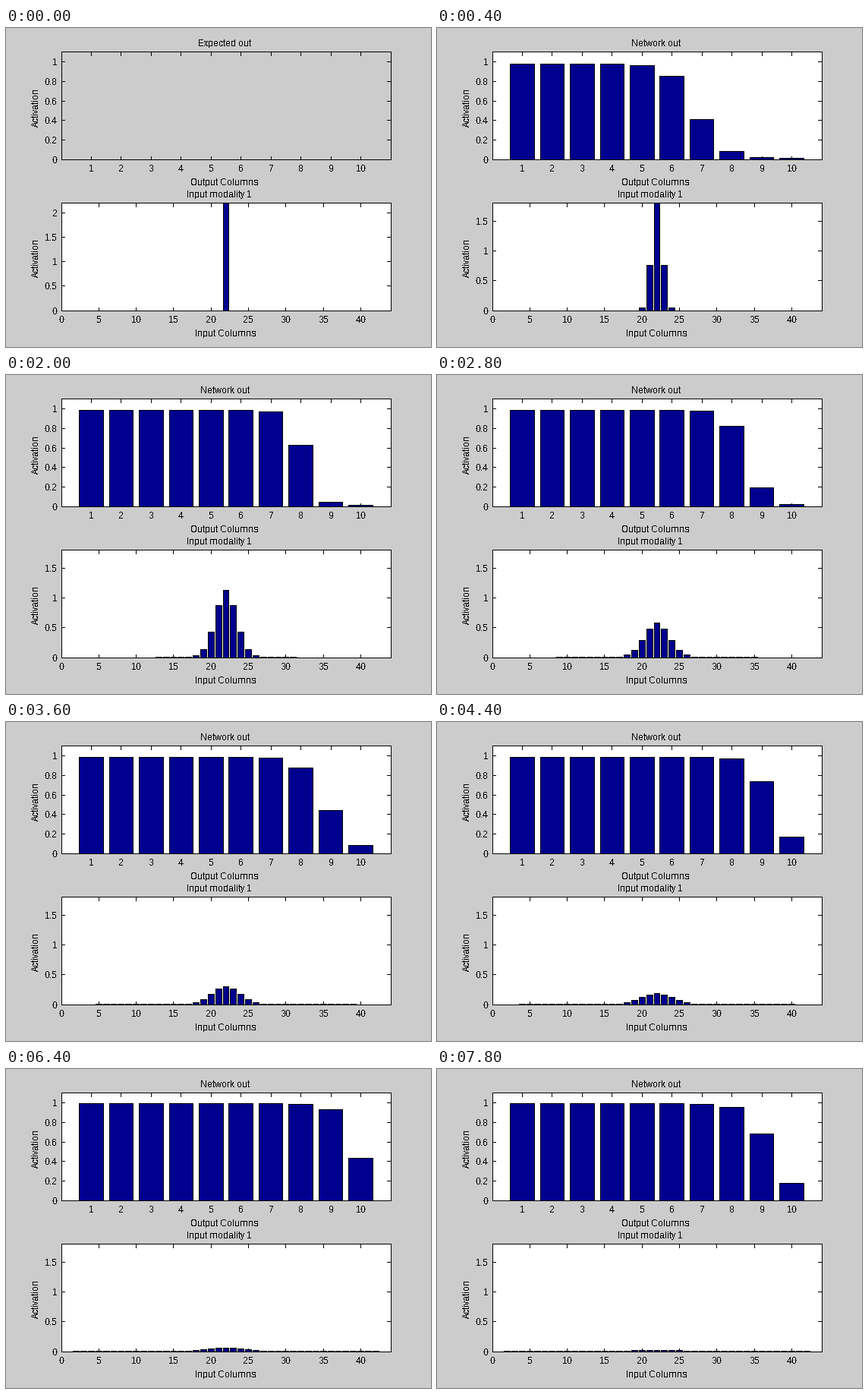
Animation, 560 px wide and 420 px high, one loop 8000 ms. Source, as a matplotlib script:

```python
import numpy as np
import matplotlib.pyplot as plt
from matplotlib.animation import FuncAnimation
from matplotlib.patches import Rectangle

plt.rcParams.update({
    "font.family": "Liberation Sans",
    "font.size": 12 * 0.72,
    "text.antialiased": False,
    "text.hinting": "native",
    "text.hinting_factor": 1,
})

W, H, DPI = 560, 420, 100
FRAMES, STEP_MS = 40, 200
GRAY, NAVY = "#cccccc", "#00008f"
LEFT, WIDTH, HEIGHT = 73, 434, 141.5
TOP_BASE, LOW_BASE = 173.3, 372.1
TOP_MAX, FIRST_MAX, LOW_MAX = 1.1, 2.2, 1.8
N_OUT, N_IN, CENTER = 10, 43, 22

# Ticks of the clock at which the simulation does not advance
HOLDS = {4, 7, 13, 17, 19, 27, 29, 37}

# The output is a step whose edge moves: (time, edge position, steepness)
EDGE = [(0, 6.5, 2.2), (6, 7.52, 2.3), (10, 8.14, 3.9), (18, 8.9, 2.3),
        (26, 9.88, 3.1), (32, 9.91, 3), (39, 9.32, 2.4)]
# Height of the input bump: (time, height)
PEAK = [(0, 2.2), (6, 1.8), (10, 1.13), (18, 0.3), (39, 0.025)]

fig = plt.figure(figsize=(W / DPI, H / DPI), dpi=DPI, facecolor=GRAY)
ax = fig.add_axes([0, 0, 1, 1])
ax.set_xlim(0, W)
ax.set_ylim(H, 0)
ax.axis("off")


def block(x, y, w, h, color="black", z=1):
    return ax.add_patch(Rectangle((x, y), w, h, fc=color, lw=0, zorder=z,
                                  antialiased=False, snap=False))


def label(x, y, text, ha="left", **kw):
    return ax.text(x, y, text, ha=ha, va="baseline", zorder=5, **kw)


def row(base, v, top):
    return int(base - min(v / top, 1) * HEIGHT)


def panel(base):
    y0, y1 = row(base, 1, 1), int(base)
    block(LEFT, y0, WIDTH + 1, y1 - y0 + 1)
    return block(LEFT + 1, y0 + 1, WIDTH - 1, y1 - y0 - 1, "white")


def xticks(base, values, span):
    y0, y1 = row(base, 1, 1), int(base)
    for v in values:
        x = int(LEFT + v * WIDTH / span)
        block(x, y1 - 4, 1, 4, z=2)
        block(x, y0 + 1, 1, 5, z=2)
        label(x + 0.5, y1 + 16, str(v), "center")


def yticks(base, values, top):
    parts = []
    for v in values:
        y = row(base, v, top)
        parts += [block(LEFT + 1, y, 4, 1, z=2),
                  block(LEFT + WIDTH - 5, y, 5, 1, z=2),
                  label(LEFT - 5, y + 5, f"{v:g}", "right")]
    return parts


def make_bars(n):
    return [ax.add_patch(Rectangle((0, 0), 1, 1, fc=NAVY, ec="black", lw=0.72,
                                   zorder=3, antialiased=False, snap=False))
            for _ in range(n)]


def set_bars(bars, values, base, top):
    unit = WIDTH / (len(bars) + 1)
    floor = int(base)
    for i, (bar, v) in enumerate(zip(bars, values), 1):
        bar.set_visible(v > 0)
        x0 = int(LEFT + (i - 0.4) * unit)
        x1 = int(LEFT + (i + 0.4) * unit)
        y = min(row(base, v, top), floor - 1)
        bar.set_bounds(x0 + 0.5, y + 0.5, x1 - x0, floor - y)


top_face = panel(TOP_BASE)
panel(LOW_BASE)
xticks(TOP_BASE, range(1, 11), N_OUT + 1)
xticks(LOW_BASE, range(0, 41, 5), N_IN + 1)
yticks(TOP_BASE, np.arange(6) / 5, TOP_MAX)
first_ticks = yticks(LOW_BASE, np.arange(5) / 2, FIRST_MAX)
later_ticks = yticks(LOW_BASE, np.arange(4) / 2, LOW_MAX)

title = label(253, 24, "")
label(243, 207, "Output Columns")
label(238, 223, "Input modality 1")
label(249, 406, "Input Columns")
for mid in (104.5, 302.5):
    label(43, mid, "Activation", "center", rotation=90, rotation_mode="anchor")

out_bars = make_bars(N_OUT)
in_bars = make_bars(N_IN)
columns = np.arange(1, N_OUT + 1)
dist = np.abs(np.arange(1, N_IN + 1) - CENTER)


def output(t):
    times, edges, steeps = zip(*EDGE)
    edge, steep = np.interp(t, times, edges), np.interp(t, times, steeps)
    low, high = 0.015, 0.978 + 0.013 * min(t / 26, 1)
    return low + (high - low) / (1 + np.exp(steep * (columns - edge)))


def activity(t):
    """A bump that decays and spreads by diffusion, one column at a time."""
    times, heights = zip(*PEAK)
    peak = np.exp(np.interp(t, times, np.log(heights)))
    bump = peak * np.exp(-dist ** 1.91 / (0.3 + 0.355 * t))
    reach = round(np.interp(t, [0, 18, 26], [0, 17, 20]))
    return np.where(dist <= reach, np.maximum(bump, 1e-6), 0)


def draw(i):
    t = i - (i in HOLDS)
    start = t == 0
    title.set_text("Expected out" if start else "Network out")
    title.set_x(253 if start else 256)
    top_face.set_facecolor(GRAY if start else "white")
    for part in first_ticks:
        part.set_visible(start)
    for part in later_ticks:
        part.set_visible(not start)
    set_bars(out_bars, columns * 0 if start else output(t), TOP_BASE, TOP_MAX)
    set_bars(in_bars, activity(t), LOW_BASE, FIRST_MAX if start else LOW_MAX)
    return []


anim = FuncAnimation(fig, draw, frames=FRAMES, interval=STEP_MS,
                     repeat=True, repeat_delay=0, blit=False)
plt.show()
```
